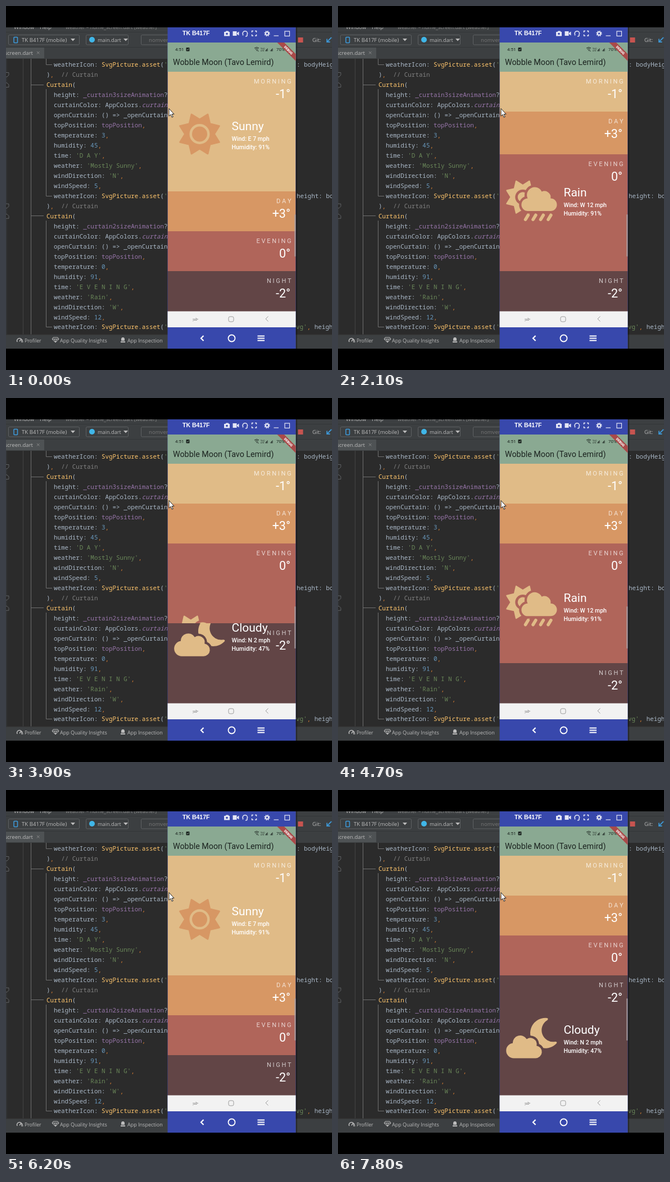
Write an HTML page that moves like this. It is 580 px wide and 648 px high and loops after 8 s.

```html
<!DOCTYPE html>
<html lang="en">
<head>
<meta charset="utf-8">
<title>Weather curtains</title>
<style>
html, body { margin: 0; width: 100%; height: 100%; overflow: hidden; background: #000; }
svg { display: block; }
text { white-space: pre; }
.ui { font: 9.6px "Open Sans", sans-serif; fill: #bbb; }
.code { font: 10.9px "Noto Sans Mono", monospace; fill: #a9b7c6; }
.app { font-family: Roboto, sans-serif; fill: #fff; }
.line { fill: none; stroke: #fff; }
</style>
</head>
<body>
<svg id="stage" width="580" height="648" viewBox="0 0 580 648">
  <defs>
    <path id="low" d="M288 512A96 96 0 0 1 272 321A96 96 0 0 1 450 270A80 80 0 0 1 574 353A80 80 0 0 1 560 512Z"/>
    <path id="high" d="M272 384A80 80 0 0 1 270 224A98 98 0 0 1 448 138A80 80 0 0 1 560 224A80 80 0 0 1 560 384Z"/>
  </defs>

  <!-- editor -->
  <rect y="38" width="580" height="572" fill="#3c3f41"/>
  <g class="ui">
    <text x="14" y="41">Window</text><text x="60" y="41">Help</text>
    <text x="106" y="41" font-size="9" fill="#888">weather – home_screen.dart [weather]</text>
    <path d="M0 46.500H580M0 73.500H580" stroke="#333638"/>
    <g fill="none" stroke="#5e6163">
      <rect x="4.500" y="51.500" width="126" height="17.500" rx="2"/>
      <rect x="142.500" y="51.500" width="75" height="17.500" rx="2"/>
      <rect x="240.500" y="51.500" width="80" height="17.500" rx="2"/>
    </g>
    <rect x="14" y="55.500" width="6.500" height="10" rx="1" fill="none" stroke="#3d9bdc" stroke-width="1.500"/>
    <text x="28" y="64">TK B417F (mobile)</text>
    <circle cx="153" cy="60" r="5" fill="#40b6e8"/>
    <text x="163" y="64" style="font-size:9.200px">main.dart</text>
    <path d="M115 58h8l-4 4.500zM209 58h8l-4 4.500z"/>
    <text x="254" y="64" fill="#777">nomvera</text>
    <rect x="519.500" y="56" width="9" height="9" fill="#c75450"/>
    <text x="545" y="64">Git:</text>
    <path d="M579 56l-8 8m0-5.500v5.500h5.500" fill="none" stroke="#3d94d1" stroke-width="1.800"/>
    <rect y="74" width="68" height="19" fill="#4e5254"/>
    <text x="48" y="87" text-anchor="end">_screen.dart</text>
    <path d="M55 81l4.500 4.500m0-4.500l-4.500 4.500" stroke="#888"/>
  </g>
  <rect y="94" width="580" height="491" fill="#2b2b2b"/>
  <rect y="94" width="2" height="491" fill="#313335"/>
  <path d="M30.500 94V585" stroke="#434343"/>
  <path d="M44.500 94V585M45 140.500H67M45 373.500H67M71.500 94V104.500H82M71.500 148V338.500H82M71.500 382V571.500H82" fill="none" stroke="#707070"/>
  <g fill="#2b2b2b" stroke="#606366">
    <path id="fold" d="M-2 118.500H5V123L2 126H-2M-2 144.500H5V140L2 137H-2"/>
    <use href="#fold" y="233.700"/>
  </g>
  <g id="code" class="code"></g>
  <path d="M0 585H580" stroke="#323232"/>
  <g class="ui" style="font-size:9px">
    <text x="31" y="598.500" text-anchor="end">s</text>
    <path d="M20 598a4.500 4.500 0 1 1 8 0M24 597l3-4" fill="none" stroke="#bbb" stroke-width="1.500"/>
    <text x="33" y="598.500" style="font-size:8.700px">Profiler</text>
    <path d="M84 590h8l2 3-6 6-6-6zM82 593h12M86 593l2 6 2-6" fill="none" stroke="#bbb"/>
    <text x="96" y="598.500">App Quality Insights</text>
    <path d="M204 599v-2h8v2zM205 596v-4l1.500-2h3l1.500 2v4z"/>
    <text x="216" y="598.500">App Inspection</text>
  </g>
  <path d="M0 0H580V38H0ZM0 610H580V648H0Z"/>

  <!-- phone -->
  <rect x="516" y="38" width="2" height="572" opacity=".35"/>
  <rect x="287.500" y="38" width="228" height="572" fill="#3848ac"/>
  <text x="314" y="52" fill="#fff" font-family="Liberation Sans, sans-serif" font-size="10.500" font-weight="bold">TK B417F</text>
  <g fill="#e4e6f5">
    <path d="M388 46h2.500l1-1.500h4l1 1.500h1.500v7.500h-10zM403.500 45h7v8h-7zM411 48l3.500-2.500v7l-3.500-2.500z"/>
    <circle cx="393" cy="49.500" r="1.800" fill="#3848ac"/>
  </g>
  <g fill="none" stroke="#e4e6f5" stroke-width="1.500">
    <path d="M421 50v-1a4.300 4.300 0 0 1 8.600 0v1M421.500 49.500v3M429 49.500v3q0 1.500-3 1.500"/>
    <path d="M437.500 47v-2.500h2.500M443 44.500h2.500v2.500M445.500 50.500v2.500h-2.500M440 53h-2.500v-2.500"/>
    <circle cx="464.500" cy="49" r="2.700" stroke-width="2"/>
    <circle cx="464.500" cy="49" r="4.400" stroke-dasharray="1.800 1.660"/>
    <path d="M476.500 53h8.500" stroke-width="1.200"/>
    <rect x="496" y="45" width="8.500" height="8.500" stroke-width="1.200"/>
  </g>
  <rect x="287.500" y="65" width="228" height="52" fill="#8aa992"/>
  <g class="app" style="fill:#1c2420">
    <text x="301" y="80" font-size="8">4:51</text>
    <rect x="320.500" y="74" width="6" height="6.500" rx="1"/>
    <path d="M322 77l1.300 1.300 2-2.500" fill="none" stroke="#8aa992"/>
    <path d="M442 75q4-3 8 0M443.500 77q2.500-2 5 0M445 79h2l2.500 1.500" fill="none" stroke="#1c2420"/>
    <text x="453" y="77" font-size="4">Vo))</text><text x="453" y="81" font-size="4">LTE</text>
    <path d="M462 80.500v-2m1.500 2v-3.500m1.500 3.500v-5M471 80.500v-2m1.500 2v-3.500m1.500 3.500v-5" stroke="#1c2420"/>
    <text x="481" y="80" font-size="8">70%</text>
    <text x="297" y="105" font-size="14.300">Wobble Moon (Tavo Lemird)</text>
  </g>
  <path d="M482.500 65H495L515.500 85.500V98Z" fill="#a94a49"/>
  <text class="app" transform="translate(502 79) rotate(45)" y="1.500" text-anchor="middle" font-size="6" font-weight="900">DEBUG</text>
  <g id="curtains"></g>
  <rect x="513" y="371" width="2.500" height="75" rx="1" fill="#a9a0a0" opacity=".75"/>
  <rect x="287.500" y="543.500" width="228" height="28.500" fill="#f2f2f2"/>
  <g class="line" style="stroke:#999">
    <path d="M332 557.500h8l-2.500-2.500M342 557.500h-8M334 559.500h6M334 559.500l-2 1.500"/>
    <rect x="396" y="553" width="9" height="9" rx="2.500"/>
    <path d="M466.500 552.500l-4.500 4.500 4.500 4.500"/>
  </g>
  <g class="line" stroke-width="2.200">
    <path d="M351.500 587l-4.500 4.500 4.500 4.500M447.500 587.500h12.500M447.500 591.500h12.500M447.500 595.500h12.500"/>
    <circle cx="401.500" cy="591.500" r="6" stroke-width="1.800"/>
  </g>
  <path d="M290 182.500v13.500l3-2.800 2.200 5 2-.9-2.200-4.800h4z" fill="#fff" stroke="#111" stroke-width=".9"/>
</svg>

<script>
const byId = id => document.getElementById(id);

// Code listing
const tokens = /('[^']*'?|^vg')|(\/\/.*)|(_curtain\d\w+|(?<=: )topPosition|(?<=\.)curtain)|(^Curtain|SvgPicture\.asset)|(\d+(?=,))|(,)/g;
const inks = ['#6a8759', '#808080', '#9876aa', '#ffc66d', '#6897bb', '#cc7832'];
const paint = s => s.replace(tokens, (m, ...groups) => {
  const kind = groups.findIndex(g => g !== undefined);
  const slant = m === 'curtain' ? ' font-style="italic"' : '';
  return `<tspan fill="${inks[kind]}"${slant}>${m}</tspan>`;
});
const icon = "weatherIcon: SvgPicture.asset('";
const block = (n, temp, humidity, time, weather, dir, speed) => [
  'Curtain(', `height: _curtain${n}sizeAnimation?`, 'curtainColor: AppColors.curtain',
  'openCurtain: () => _openCurtain', 'topPosition: topPosition,', `temperature: ${temp},`,
  `humidity: ${humidity},`, `time: '${time}',`, `weather: '${weather}',`,
  `windDirection: '${dir}',`, `windSpeed: ${speed},`, icon];
const lines = [icon, '),  // Curtain',
  ...block(3, 3, 45, 'D A Y', 'Mostly Sunny', 'N', 5), '),  // Curtain',
  ...block(2, 0, 91, 'E V E N I N G', 'Rain', 'W', 12)];
const put = (x, row, s) => `<text x="${x}" y="${108 + row * 17.98}">${paint(s)}</text>`;
byId('code').innerHTML =
  lines.map((s, i) => put(/^(Curtain|\))/.test(s) ? 72 : 85, i, s)).join('') +
  put(517, 0, ': bodyHeight') + put(517, 13, 'height: bodyHeight') +
  put(516, 26, "vg', height: bodyHeight");

// Weather icons on a 512-unit high grid
const colors = ['#e0bb87', '#d79764', '#b0655a', '#624546'];
const [sand, orange, red, plum] = colors;
const sun = (r, disc, hole, ink, paper) => {
  const pts = Array.from({ length: 16 }, (_, i) => {
    const a = i * Math.PI / 8, d = r * (i % 2 ? 1.05 : .72);
    return `${r + d * Math.sin(a)},${r - d * Math.cos(a)}`;
  });
  return `<polygon points="${pts.join(' ')}" fill="${ink}" stroke="${ink}" stroke-width="${r * .08}" stroke-linejoin="round"/>
    <circle cx="${r}" cy="${r}" r="${hole}" fill="${paper}"/><circle cx="${r}" cy="${r}" r="${disc}" fill="${ink}"/>`;
};
const cloud = (shape, dx, ink, paper) =>
  `<use href="#${shape}" x="${dx}" fill="${ink}" stroke="${paper}" stroke-width="60"/>
   <use href="#${shape}" x="${dx}" fill="${ink}"/>`;
const rain = [276, 372, 468, 564].map(x => `M${x} 436l-34 56`).join('');
const icons = [
  `<g transform="translate(64)">${sun(256, 96, 128, orange, sand)}</g>`,
  sun(208, 64, 96, red, orange) + cloud('low', 0, red, orange),
  sun(208, 64, 96, sand, red) + cloud('high', 0, sand, red) +
    `<path d="${rain}" stroke="${sand}" stroke-width="40" stroke-linecap="round"/>`,
  `<path d="M518 3A192 192 0 1 0 637 322Q645 300 616 303A147 147 0 0 1 519 31Q535 12 518 3Z" fill="${sand}"/>` +
    cloud('low', -192, sand, plum)
];

// Curtains
const info = [
  ['M O R N I N G', '-1°', ['Sunny'], 'E 7', 91],
  ['D A Y', '+3°', ['Mostly', 'Sunny'], 'N 5', 45],
  ['E V E N I N G', '0°', ['Rain'], 'W 12', 91],
  ['N I G H T', '-2°', ['Cloudy'], 'N 2', 47]
];
const TOP = 116.5, UNIT = 427 / 6;
byId('curtains').innerHTML = info.map(([time, temp, title, wind, humidity], i) => {
  const shift = (title.length - 1) * 15;
  const heading = title.map((s, n) =>
    `<text x="401.500" y="${-7.5 - shift + n * 30}" font-size="21">${s}</text>`).join('');
  return `<svg class="app" x="287.500" width="228" overflow="hidden">
    <rect width="228" height="430" fill="${colors[i]}"/>
    <g transform="translate(-287.500)">
      <text x="507.500" y="20.500" font-size="11" fill-opacity=".72" text-anchor="end">${time}</text>
      <text x="506" y="47" font-size="21.500" text-anchor="end">${temp}</text>
      <g class="content">
        <g transform="translate(299.500 -36) scale(.1406)">${icons[i]}</g>
        ${heading}
        <g font-size="10.500" font-weight="500">
          <text x="401.500" y="${11.5 + shift}">Wind: ${wind} mph</text>
          <text x="401.500" y="${26.5 + shift}">Humidity: ${humidity}%</text>
        </g>
      </g>
    </g></svg>`;
}).join('');
const panels = [...byId('curtains').children];
const contents = panels.map(p => p.querySelector('.content'));

// Motion
const bezier = (x1, y1, x2, y2) => x => {
  if (x >= 1) return 1;
  const at = (a, b, s) => 3 * (1 - s) * (1 - s) * s * a + 3 * (1 - s) * s * s * b + s * s * s;
  let lo = 0, hi = 1;
  for (let i = 0; i < 24; i++) {
    const mid = (lo + hi) / 2;
    if (at(x1, x2, mid) < x) lo = mid; else hi = mid;
  }
  return at(y1, y2, lo);
};
const open = bezier(.4, 0, .2, 1), slide = bezier(.25, .1, .25, 1);
const taps = [[705, 1], [1728, 2], [2740, 3], [3730, 2], [4705, 1], [5470, 0], [6692, 3]];

function draw(t) {
  let sizes = [3, 1, 1, 1], pos = 0;
  for (const [start, k] of taps) {
    if (t <= start) break;
    const p = open((t - start) / 490);
    sizes = sizes.map((v, i) => v + ((i === k ? 3 : 1) - v) * p);
    pos += (k - pos) * slide((t - start) / 950);
  }
  let edge = TOP;
  const center = TOP + 111.5 + pos * UNIT;
  panels.forEach((panel, i) => {
    const y = Math.round(edge);
    edge += sizes[i] * UNIT;
    panel.setAttribute('y', y);
    panel.setAttribute('height', Math.round(edge) - y);
    contents[i].setAttribute('transform', `translate(0 ${center - y})`);
  });
}
const begin = performance.now();
(function tick() {
  draw((performance.now() - begin) % 8000);
  requestAnimationFrame(tick);
})();
</script>
</body>
</html>
```
